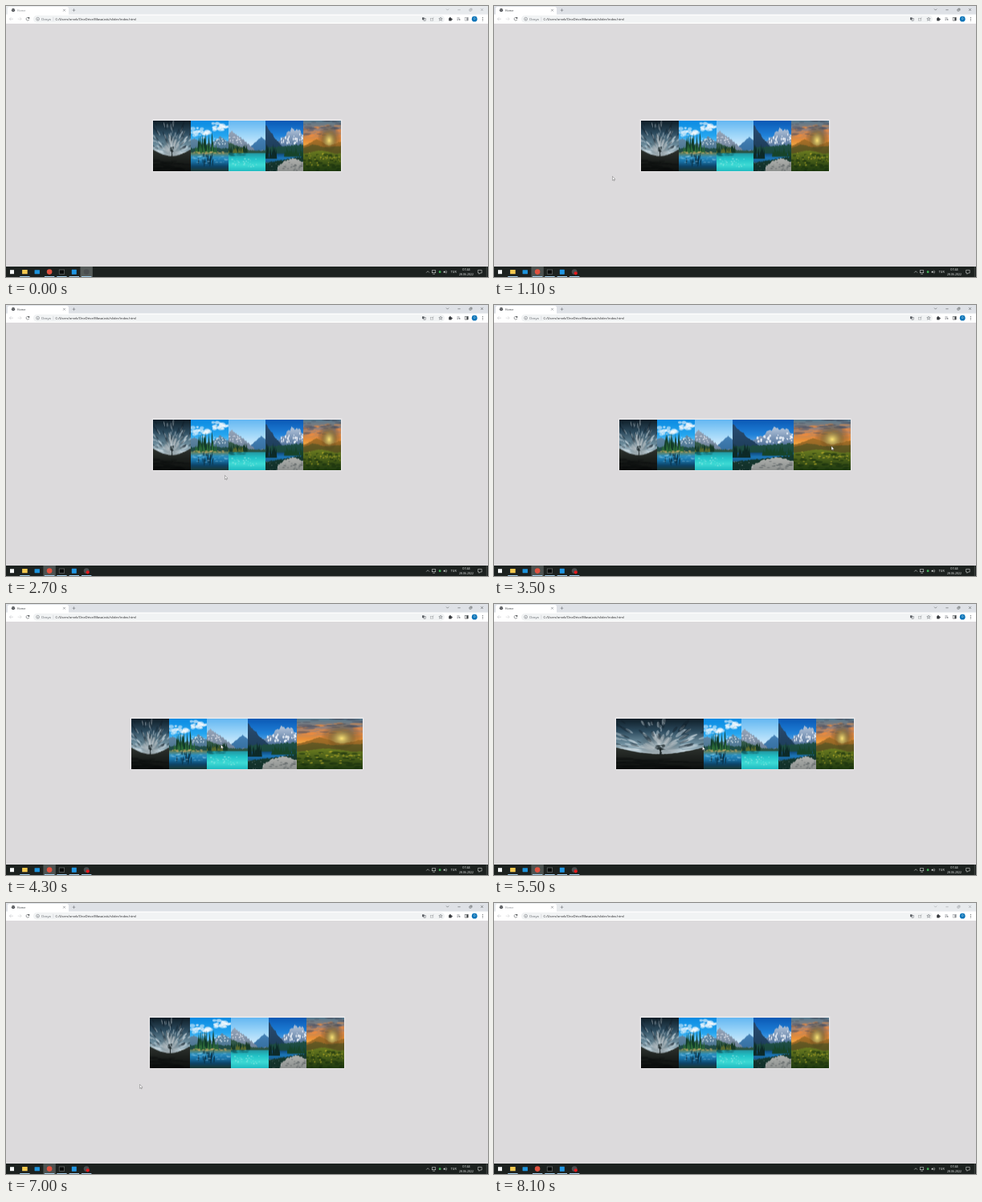
Recreate the animation shown at these times as an HTML page with a canvas. Size 600x338 px, loop 8.2 s.

```html
<!DOCTYPE html>
<html lang="tr">
<head>
<meta charset="utf-8">
<title>Home</title>
<style>
  html, body { margin: 0; width: 100%; height: 100%; overflow: hidden; background: #dcdadc; }
  canvas { display: block; width: 600px; height: 338px; }
</style>
</head>
<body>
<canvas id="stage"></canvas>
<script>
const LOOP = 8200, STEP = 100, FADE = 500;
const PANELS = 5, SLIM = 46.9, GROW = 62, TOP = 142.5, TALL = 63;
const UI = '"Open Sans", sans-serif';

const canvas = document.getElementById('stage');
const dpr = Math.max(1, window.devicePixelRatio || 1);
canvas.width = 600 * dpr;
canvas.height = 338 * dpr;
const c = canvas.getContext('2d');

// ---- small helpers ----
function rng(seed) {
  return () => (seed = (seed * 16807) % 2147483647) / 2147483647;
}

function box(x, y, w, h, fill, r = 0) {
  c.fillStyle = fill;
  c.beginPath();
  c.roundRect(x, y, w, h, r);
  c.fill();
}

function disc(x, y, r, fill) {
  c.fillStyle = fill;
  c.beginPath();
  c.arc(x, y, r, 0, 7);
  c.fill();
}

function ring(x, y, r, color, from = 0, to = 7) {
  c.strokeStyle = color;
  c.lineWidth = 0.5;
  c.beginPath();
  c.arc(x, y, r, from, to);
  c.stroke();
}

// Strokes an SVG path placed at x, y.
function mark(d, x, y, color, width = 0.5, fill) {
  c.save();
  c.translate(x, y);
  const p = new Path2D(d);
  if (fill) {
    c.fillStyle = fill;
    c.fill(p);
  }
  c.strokeStyle = color;
  c.lineWidth = width;
  c.stroke(p);
  c.restore();
}

function frame(x, y, w, h, color) {
  c.strokeStyle = color;
  c.lineWidth = 0.5;
  c.strokeRect(x, y, w, h);
}

function text(str, x, y, size, color, align = 'left') {
  c.font = `${size}px ${UI}`;
  c.fillStyle = color;
  c.textAlign = align;
  c.fillText(str, x, y);
}

// ---- landscapes, painted in a unit square ----
const peak = (x, at, half) => Math.max(0, 1 - Math.abs(x - at) / half);

function scene(seed, paint) {
  const pic = document.createElement('canvas');
  pic.width = 220;
  pic.height = 126;
  const g = pic.getContext('2d');
  g.scale(pic.width, pic.height);
  const rand = rng(seed);

  const shade = (y0, y1, colors) => {
    const s = g.createLinearGradient(0, y0, 0, y1);
    colors.forEach((col, i) => s.addColorStop(i / (colors.length - 1), col));
    return s;
  };
  const blob = (x, y, rx, ry, tilt = 0) => {
    const size = 0.4 + rand() * 0.8;
    g.beginPath();
    g.ellipse(x, y, rx * size, ry * size, tilt, 0, 7);
    g.fill();
  };
  paint({
    fill(y0, y1, ...colors) {
      g.fillStyle = shade(y0, y1, colors);
      g.fillRect(0, y0, 1, y1 - y0);
    },
    ridge(colors, rough, height) {
      g.fillStyle = shade(0.2, 1, colors);
      g.beginPath();
      g.moveTo(0, 1);
      for (let x = 0; x <= 1.01; x += 0.02) g.lineTo(x, height(x) + (rand() - 0.5) * rough);
      g.lineTo(1, 1);
      g.fill();
    },
    scatter(style, n, x0, x1, y0, y1, rx, ry = rx / 2) {
      g.fillStyle = style;
      while (n--) blob(x0 + rand() * (x1 - x0), y0 + rand() * (y1 - y0), rx, ry);
    },
    burst(style, n, x, y, near, far) {
      g.fillStyle = style;
      while (n--) {
        const a = -Math.PI * rand(), d = near + rand() * (far - near);
        blob(x + d * Math.cos(a), y + d * Math.sin(a), 0.08, 0.022, a);
      }
    },
    firs(style, n, x0, x1, base, tall) {
      g.fillStyle = style;
      while (n--) {
        const x = x0 + rand() * (x1 - x0), tip = base - tall * (0.4 + rand() * 0.6);
        g.beginPath();
        g.moveTo(x, tip);
        g.lineTo(x + 0.025, base);
        g.lineTo(x - 0.025, base);
        g.fill();
      }
    },
    glow(x, y, r, color) {
      const s = g.createRadialGradient(x, y, 0, x, y, r);
      s.addColorStop(0, color);
      s.addColorStop(1, 'transparent');
      g.fillStyle = s;
      g.fillRect(0, 0, 1, 1);
    }
  });
  return pic;
}

const scenes = [
  scene(11, ({ fill, ridge, scatter, burst, glow }) => {
    fill(0, 0.75, '#0e1c26', '#2c4a5d', '#6f8f9f', '#cfdbe0');
    burst('rgba(225,235,240,.4)', 70, 0.5, 0.66, 0.15, 0.6);
    burst('rgba(14,28,38,.4)', 45, 0.5, 0.66, 0.3, 0.8);
    glow(0.5, 0.55, 0.25, 'rgba(235,242,245,.7)');
    ridge(['#49504b', '#2b302c', '#0d0f0e'], 0.006, x => 0.58 + 0.13 * Math.sin(Math.PI * x));
    scatter('rgba(8,10,9,.35)', 30, 0, 1, 0.78, 1, 0.16, 0.02);
    scatter('rgba(30,42,46,.5)', 30, 0.46, 0.56, 0.52, 0.63, 0.025);
    scatter('#1a2223', 12, 0.505, 0.515, 0.6, 0.72, 0.008, 0.02);
  }),
  scene(23, ({ fill, ridge, scatter, firs }) => {
    fill(0, 0.62, '#0a8ae2', '#25a6f0', '#b4e0f6');
    scatter('rgba(255,255,255,.6)', 20, 0.6, 1, 0.06, 0.2, 0.07);
    scatter('rgba(255,255,255,.5)', 20, 0, 0.5, 0.15, 0.35, 0.07);
    ridge(['#6f93ae', '#2a5775'], 0.04, x => 0.46 - 0.15 * peak(x, 0.8, 0.25) - 0.1 * peak(x, 0.1, 0.2));
    scatter('rgba(240,248,252,.75)', 24, 0.6, 1, 0.36, 0.48, 0.02);
    ridge(['#2a5c50', '#153a3c'], 0.03, x => 0.54 + 0.02 * Math.sin(9 * x));
    fill(0.64, 1, '#6d7f50', '#2a8fc0', '#1871a6', '#0d4468', '#1a3836');
    firs('#123c2b', 24, 0.2, 0.6, 0.64, 0.42);
    firs('#2c6a38', 18, 0.1, 0.7, 0.65, 0.24);
    scatter('#b8a266', 18, 0.1, 0.9, 0.62, 0.66, 0.04, 0.01);
    scatter('rgba(8,40,58,.55)', 26, 0.2, 0.6, 0.68, 0.86, 0.02, 0.06);
    scatter('rgba(165,220,245,.5)', 26, 0, 1, 0.7, 0.85, 0.05, 0.008);
  }),
  scene(37, ({ fill, ridge, scatter, firs }) => {
    fill(0, 0.65, '#62b6f2', '#a5dafa', '#f0f7fa');
    ridge(['#4a8ac0', '#245684'], 0.015, x => 0.61 - 0.28 * peak(x, 0.88, 0.42));
    ridge(['#97a5b8', '#46617f'], 0.05, x => 0.6 - 0.37 * peak(x, 0.1, 0.6) ** 0.8);
    scatter('rgba(242,246,252,.65)', 30, 0, 0.35, 0.32, 0.46, 0.02);
    ridge(['#3d6350', '#1c4537'], 0.03, x => 0.6 - 0.16 * peak(x, 0, 0.6));
    firs('#163927', 40, 0, 0.5, 0.64, 0.17);
    firs('#5a6a2e', 16, 0, 0.4, 0.65, 0.13);
    fill(0.65, 1, '#2298a4', '#22c4c8', '#3edbd5', '#22bcc2');
    scatter('rgba(15,85,90,.4)', 18, 0, 0.5, 0.65, 0.7, 0.07, 0.015);
    scatter('rgba(200,248,242,.6)', 28, 0.1, 0.75, 0.76, 0.92, 0.025, 0.008);
  }),
  scene(53, ({ fill, ridge, scatter, firs }) => {
    fill(0, 0.6, '#0a58b4', '#1f80d8', '#86c0ee');
    ridge(['#a9bcd4', '#3c618e', '#1c4164'], 0.06,
      x => 0.42 - 0.26 * peak(x, 0.7, 0.35) - 0.14 * peak(x, 0.9, 0.12));
    scatter('rgba(246,250,255,.8)', 36, 0.4, 1, 0.28, 0.47, 0.018, 0.026);
    ridge(['#27496c', '#143148'], 0.05, x => 0.1 + x);
    ridge(['#24584c', '#143c34'], 0.04, x => 0.54 - 0.06 * x);
    fill(0.66, 0.84, '#0f4a80', '#1c78ba', '#145480');
    firs('#17442a', 40, 0.5, 1, 0.72, 0.19);
    firs('#0d2a28', 26, 0, 0.28, 0.76, 0.3);
    ridge(['#1f4f38', '#122f2a'], 0.04, x => 0.84 - 0.12 * x);
    ridge(['#ffffff', '#c4c5c2', '#8f9290'], 0.03, x => 1 - 0.25 * peak(x, 0.72, 0.42) ** 0.4);
    scatter('rgba(75,82,85,.55)', 24, 0.42, 1, 0.83, 1, 0.035, 0.012);
    scatter('rgba(225,232,235,.6)', 12, 0, 0.35, 0.82, 1, 0.015);
  }),
  scene(71, ({ fill, ridge, scatter, glow }) => {
    fill(0, 0.6, '#4f788f', '#9a8076', '#e88d38', '#f9c250');
    scatter('rgba(250,140,55,.4)', 40, 0, 1, 0.08, 0.36, 0.09, 0.02);
    scatter('rgba(75,80,98,.45)', 28, 0, 1, 0, 0.3, 0.1, 0.02);
    glow(0.68, 0.4, 0.32, 'rgba(255,240,140,1)');
    ridge(['#b5782a', '#6a4f20'], 0.015, x => 0.5 - 0.13 * peak(x, 0.35, 0.3) - 0.08 * peak(x, 1, 0.3));
    ridge(['#80612a', '#3a4a18'], 0.015, x => 0.56 - 0.07 * peak(x, 0.25, 0.3) - 0.05 * x);
    ridge(['#a8992c', '#6c7c20', '#1f3a10'], 0.015, x => 0.63 + 0.03 * Math.cos(7 * x));
    scatter('rgba(22,46,14,.55)', 44, 0, 1, 0.68, 1, 0.06, 0.022);
    scatter('rgba(196,182,44,.55)', 40, 0, 1, 0.64, 0.9, 0.02, 0.012);
    glow(0.68, 0.4, 0.22, 'rgba(255,225,110,.7)');
  })
];

// ---- motion ----
// [time, x, y] of the pointer tip
const path = [
  [200, 98, 331], [1100, 147.5, 212.5], [1500, 192, 182], [1950, 192, 182], [2400, 236, 232],
  [2700, 272.5, 212.5], [2820, 276, 232], [3500, 420, 176], [4060, 400, 176], [4300, 267.5, 175.5],
  [4600, 200, 178], [5000, 200, 178], [5500, 259.5, 177.5], [5750, 365, 178], [6500, 258, 178],
  [6800, 172, 208], [7500, 153, 272]
];

function pointerAt(t) {
  const i = path.findIndex(p => p[0] > t);
  if (i < 1) return path.at(i).slice(1);
  const [t0, x0, y0] = path[i - 1], [t1, x1, y1] = path[i];
  const k = (t - t0) / (t1 - t0);
  return [x0 + (x1 - x0) * k, y0 + (y1 - y0) * k];
}

// The CSS "ease" curve, cubic-bezier(.25, .1, .25, 1)
function ease(x) {
  if (x <= 0 || x >= 1) return x <= 0 ? 0 : 1;
  const curve = (a, b, s) => 3 * a * s * (1 - s) ** 2 + 3 * b * s * s * (1 - s) + s ** 3;
  let lo = 0, hi = 1;
  for (let i = 0; i < 16; i++) {
    const mid = (lo + hi) / 2;
    if (curve(0.25, 0.25, mid) < x) lo = mid; else hi = mid;
  }
  return curve(0.1, 1, lo);
}

const leftEdge = widths => 300 - widths.reduce((a, b) => a + b) / 2;

function hovered(widths, [x, y]) {
  if (y < TOP || y > TOP + TALL) return -1;
  let left = leftEdge(widths);
  return widths.findIndex(w => {
    left += w;
    return x >= left - w && x < left;
  });
}

// Runs the hover transitions once and keeps the panel widths of every step.
function runHover() {
  const panels = Array.from({ length: PANELS }, () => ({ from: 0, to: 0, start: 0 }));
  const extra = (p, t) => p.from + (p.to - p.from) * ease((t - p.start) / FADE);
  const steps = [];
  for (let t = 0; t < LOOP; t += 10) {
    const widths = panels.map(p => SLIM + extra(p, t));
    if (t % STEP === 0) steps.push(widths);
    const over = hovered(widths, pointerAt(t));
    panels.forEach((p, i) => {
      const to = i === over ? GROW : 0;
      if (to !== p.to) Object.assign(p, { from: extra(p, t), to, start: t });
    });
  }
  return steps;
}
const widthsAt = runHover();

// ---- drawing ----
function drawBrowser(active) {
  const ink = active ? '#3c4043' : '#8d9094';
  const gray = '#5f6368', cross = 'M-1.4-1.4l2.8 2.8M1.4-1.4l-2.8 2.8';
  box(0, 0, 600, 11, active ? '#dee1e6' : '#e7eaed');
  box(2, 1, 76, 12, '#fff', 2.5);
  disc(9, 5.2, 2.1, '#45484c');
  mark('M-1.6-.6l1.8.8 1.2-1', 9, 5.2, '#fff');
  text('Home', 13.8, 6.6, 3.75, ink);
  mark(cross, 72.5, 5.3, gray);
  mark('M-1.9 0h3.8M0-1.9v3.8', 84.5, 5.2, gray);
  mark('M-1.6-.8l1.6 1.6 1.6-1.6', 549.6, 4.4, ink);
  mark('M-1.6 0h3.2', 564, 4.8, ink);
  mark('M-1.5-.5h2.2v2.2h-2.2zM-.7-1.3h2.3v2.3', 578.4, 4.5, ink);
  mark(cross, 592.5, 4.6, ink);

  box(0, 10.4, 600, 11.6, '#fff');
  const arrow = 'M4.6 0h-4.6M2-2l-2 2 2 2';
  mark(arrow, 4.4, 16.2, '#b4b7ba');
  c.save();
  c.scale(-1, 1);
  mark(arrow, -19.2, 16.2, '#c8cacc');
  c.restore();
  ring(27, 16.2, 1.9, '#35383c', 0.3, 5.6);
  box(27.6, 14.1, 1.6, 1.6, '#35383c');

  box(34, 11.7, 512, 9, '#f1f3f4', 4.5);
  ring(39.6, 16.2, 1.9, gray);
  mark('M0-.3v1.4', 39.6, 16.2, gray);
  text('Dosya', 44.2, 17.7, 4.05, gray);
  mark('M0-2.4v4.8', 58.8, 16.2, '#c3c6ca');
  text('C:/Users/orvek/OneDrive/Masaüstü/slider/index.html', 61.5, 17.7, 4.05, '#202124');

  box(518, 14.2, 2.6, 3, gray, 0.3);
  frame(520, 15.4, 2.2, 2.8, gray);
  frame(528.6, 15.2, 3.2, 2.9, '#9a9da1');
  mark('M0 0l2.6-2.4', 530, 16.6, '#9a9da1');
  mark('M0-2.3l.6 1.5 1.6.1-1.3 1 .5 1.6-1.4-.9-1.4.9.5-1.6-1.3-1 1.6-.1z', 541, 16.3, gray);
  box(551.2, 14.9, 3.5, 3.5, '#35383c', 0.4);
  disc(552.9, 14.6, 0.8, '#35383c');
  disc(555, 16.6, 0.8, '#35383c');
  mark('M-1.6-1.4h3.2M-1.6 0h3.2M-1.6 1.4h1.8', 563, 16.2, gray);
  disc(564.7, 17, 0.8, gray);
  frame(571.2, 14.3, 4, 3.8, ink);
  box(573.3, 14.3, 1.9, 3.8, ink);
  disc(583.2, 16.2, 3.4, '#0b74b8');
  text('O', 583.2, 17.4, 3.2, '#fff', 'center');
  for (let i = -1; i < 2; i++) disc(593.3, 16.2 + i * 1.7, 0.5, '#3c4043');
}

function drawTaskbar(recording, active) {
  const pale = '#f2f4f3', slot = i => 23.4 + i * 15.35;
  box(0, 325, 600, 13, '#1c211f');
  if (!recording) box(slot(5) - 7.7, 325, 15.4, 13, '#565c5a');
  if (active) box(slot(2) - 7.7, 325, 15.4, 13, '#4c5250');

  box(5, 329.2, 5, 5, '#f4f6f6');
  box(slot(0) - 3.3, 328.9, 6.6, 5.4, '#f3c84e', 0.4);
  box(slot(1) - 3.2, 329.2, 6.4, 5, '#1d93dc', 0.4);
  disc(slot(2), 331.6, 3.3, '#e0523f');
  box(slot(3) - 3.3, 329, 6.6, 5.2, '#0a0c0c');
  frame(slot(3) - 3.3, 329, 6.6, 5.2, '#8c9190');
  box(slot(4) - 3, 328.7, 6, 6, '#2196e3', 0.4);
  disc(slot(5), 331.6, 3.4, '#4a4e50');
  if (recording) disc(slot(5) + 1.6, 333.3, 2.1, '#e5191d');
  for (let i = 0; i < 6; i++) if (i !== 1) box(slot(i) - 6.2, 337, 12.4, 1, '#a3cdea');

  mark('M-1.9 1l1.9-1.9 1.9 1.9', 525.1, 331.6, pale);
  frame(530.4, 329.8, 4.4, 3, pale);
  mark('M0 0h2.8', 531.2, 334.2, pale);
  box(538.8, 330.3, 2.6, 2.8, '#3fae55', 0.8);
  box(544.8, 330.8, 1.6, 1.8, pale);
  ring(546.2, 331.7, 1.5, pale, -1, 1);
  ring(546.2, 331.7, 2.6, '#9ea3a1', -1, 1);
  text('TUR', 557.2, 333.1, 3.6, pale, 'center');
  text('07:44', 573, 330.3, 3.7, pale, 'center');
  text('28.06.2022', 573, 336, 3.5, pale, 'center');
  mark('M0 0h4.6v3.6h-1.8l-1.4 1.4v-1.4h-1.4z', 587.6, 329.4, pale);
  mark('M0 0v13', 598.3, 325, '#6a6f6d');
}

function drawSlider(widths) {
  let x = leftEdge(widths);
  box(x - 1, TOP - 1, 602 - 2 * x, TALL + 2, '#eceaec');
  widths.forEach((w, i) => {
    c.drawImage(scenes[i], x, TOP, w, TALL);
    x += w;
  });
}

function drawPointer(t) {
  if (t < path[0][0] || t >= 8100) return;
  mark('M0 0v5l1.2-1 .7 1.6 .7-.3-.7-1.6h1.6z', ...pointerAt(t), '#3a3a3a', 0.35, '#fff');
}

function draw(now) {
  const step = Math.floor((now % LOOP) / STEP), t = step * STEP;
  const active = t >= 800 && t < 8100;
  c.setTransform(dpr, 0, 0, dpr, 0, 0);
  c.imageSmoothingQuality = 'high';
  box(0, 0, 600, 338, '#dcdadc');
  drawBrowser(active);
  drawSlider(widthsAt[step]);
  drawTaskbar(t >= 300, active);
  drawPointer(t);
}

const begin = performance.now();
function tick() {
  draw(performance.now() - begin);
  requestAnimationFrame(tick);
}
tick();
</script>
</body>
</html>
```
